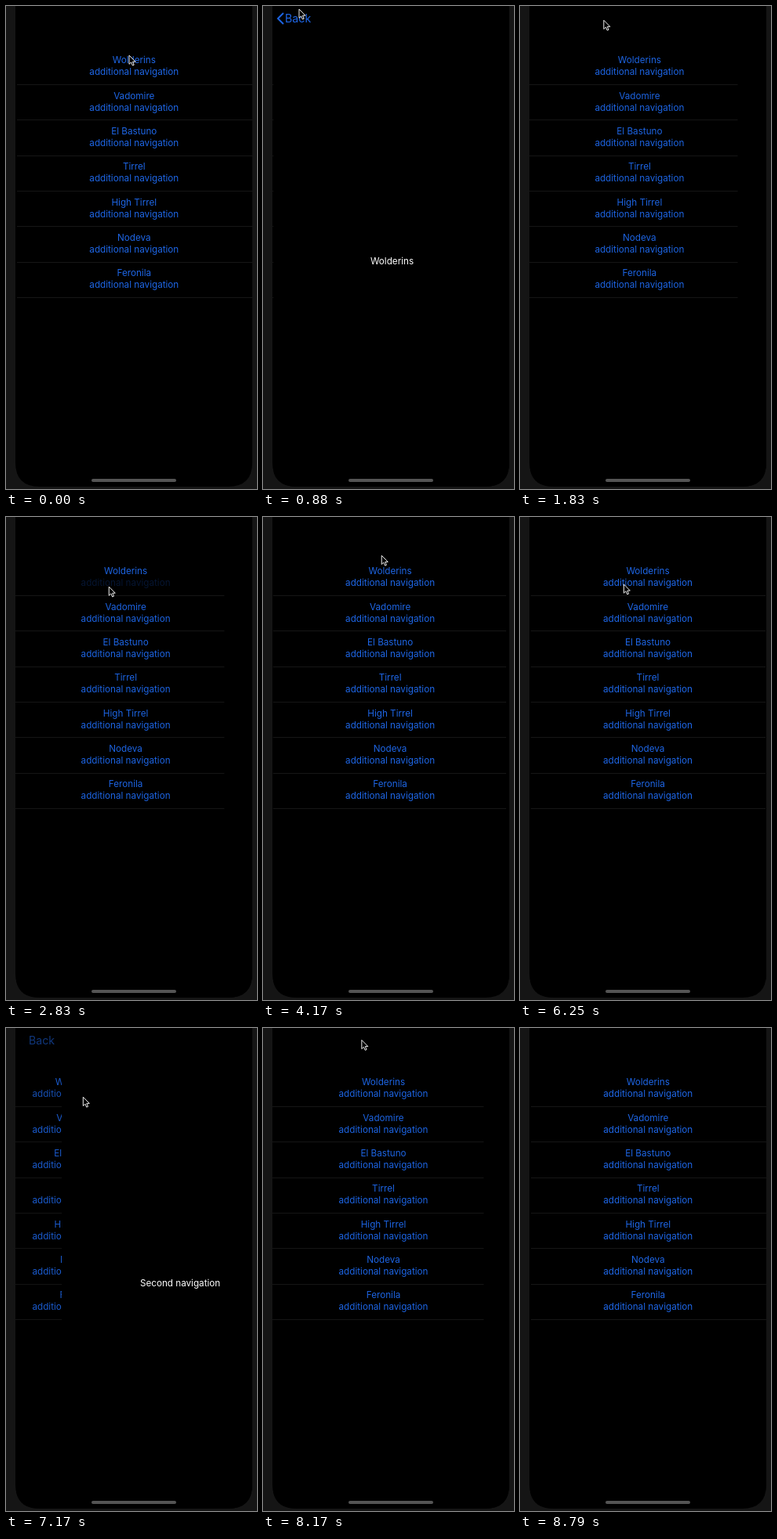
Write an HTML page that moves like this. It is 320 by 617 pixels and loops after 8830 ms.

```html
<!DOCTYPE html>
<html lang="en">
<head>
<meta charset="utf-8">
<title>List navigation</title>
<style>
  html, body { margin: 0; width: 100%; height: 100%; overflow: hidden; background: #151515; }
  svg { display: block; width: 320px; height: 617px; }
  text { font: 11.7px Inter, sans-serif; fill: #1e66e6; }
  #list text, #title { text-anchor: middle; }
  #title { fill: #fff; }
  #back text { font-size: 14.2px; }
</style>
</head>
<body>
<svg viewBox="0 0 320 617">
  <clipPath id="screen"><path d="M12 0H314V583Q314 614 283 614H43Q12 614 12 583Z"/></clipPath>
  <rect width="320" height="617" fill="#151515"/>
  <g clip-path="url(#screen)">
    <rect width="320" height="617"/>
    <g id="list"></g>
    <g id="detail">
      <rect x="12" width="302" height="617"/>
      <text id="title" x="163" y="330.2"></text>
    </g>
    <g id="back">
      <path id="chevron" d="M26 9L19 16L26 23" fill="none" stroke="#1e66e6" stroke-width="2"/>
      <text x="28" y="20.6">Back</text>
    </g>
    <rect x="109" y="604" width="108" height="4" rx="2" fill="#545454"/>
  </g>
  <path id="cursor" d="M0 0V11.3L2.6 8.9L4.4 13L6.2 12.2L4.5 8.2H8Z" stroke="#eee" stroke-linejoin="round"/>
</svg>
<script>
const LOOP = 8830, WIDTH = 302, PITCH = 45.33, RATE = 14;
const names = ["Wolderins", "Vadomire", "El Bastuno", "Tirrel", "High Tirrel", "Nodeva", "Feronila"];

// push and pop times; visits alternate between the two lines of the first row
const visits = [[350, 1570], [2789, 3720], [4970, 5686], [6955, 7900]];
const titles = [names[0], "Second navigation"];
const backSpot = [46, 4];

const $ = id => document.getElementById(id);
const [list, detail, title, back, chevron, cursor] =
  ["list", "detail", "title", "back", "chevron", "cursor"].map($);
const clamp = v => Math.max(0, Math.min(1, v));
const mix = (a, b, k) => a + (b - a) * k;
const smooth = k => k * k * (3 - 2 * k);
const easeOut = k => 1 - (1 - k) ** 3;
const lineSpot = line => [157 - 24 * line, 63 + 26 * line];
const move = (el, x, y = 0) => el.setAttribute("transform", `translate(${x} ${y})`);

function add(tag, attrs, text = "") {
  const el = document.createElementNS("http://www.w3.org/2000/svg", tag);
  for (const key in attrs) el.setAttribute(key, attrs[key]);
  el.textContent = text;
  return list.appendChild(el);
}

const rows = names.map((name, i) => {
  const y = i * PITCH;
  add("rect", { x: 14, y: Math.round(100 + y), width: 300, height: 1, fill: "#161616" });
  return [
    add("text", { x: 163.3, y: 73.4 + y }, name),
    add("text", { x: 163.3, y: 88.4 + y }, "additional navigation")
  ];
});

// critically damped spring, 0 to 1
function spring(ms) {
  const k = Math.max(0, ms) / 1000 * RATE;
  return 1 - (1 + k) * Math.exp(-k);
}

// the pointer sweeps sideways first, then vertically
const glide = (a, b, k) => [mix(a[0], b[0], k), mix(a[1], b[1], k ** 5)];

function pointer(t, push, pop, line) {
  return t < pop
    ? glide(lineSpot(line), backSpot, smooth(clamp((t - push) / 500)))
    : glide(backSpot, lineSpot(1 - line), easeOut(clamp((t - pop - 50) / 640)));
}

function draw(t) {
  const index = Math.max(0, visits.findLastIndex(v => t >= v[0] - 150));
  const [push, pop] = visits[index];
  const line = index % 2;
  const popping = t >= pop;
  const cover = popping ? 1 - spring(t - pop) : spring(t - push);
  const away = 1 - cover;

  move(list, -0.3 * WIDTH * cover);
  list.setAttribute("opacity", 1 - 0.12 * cover);
  move(detail, WIDTH * away);
  title.textContent = titles[line];

  const press = clamp((t - push + 150) / 60) * clamp((push + 250 - t) / 200);
  rows[0].forEach((el, i) => el.setAttribute("opacity", i === line ? 1 - 0.78 * press : 1));

  move(back, away * (popping ? 16 : 5), popping ? -away * 11 : 0);
  back.setAttribute("opacity", clamp((cover - 0.6) / 0.38) * (popping ? 0.7 : 1));
  chevron.setAttribute("opacity", clamp((cover - 0.8) / 0.2));

  move(cursor, ...pointer(t, push, pop, line));
  cursor.setAttribute("visibility", t < LOOP - 60 ? "visible" : "hidden");
}

const start = performance.now();
function tick() {
  draw((performance.now() - start) % LOOP);
  requestAnimationFrame(tick);
}
tick();
</script>
</body>
</html>
```
